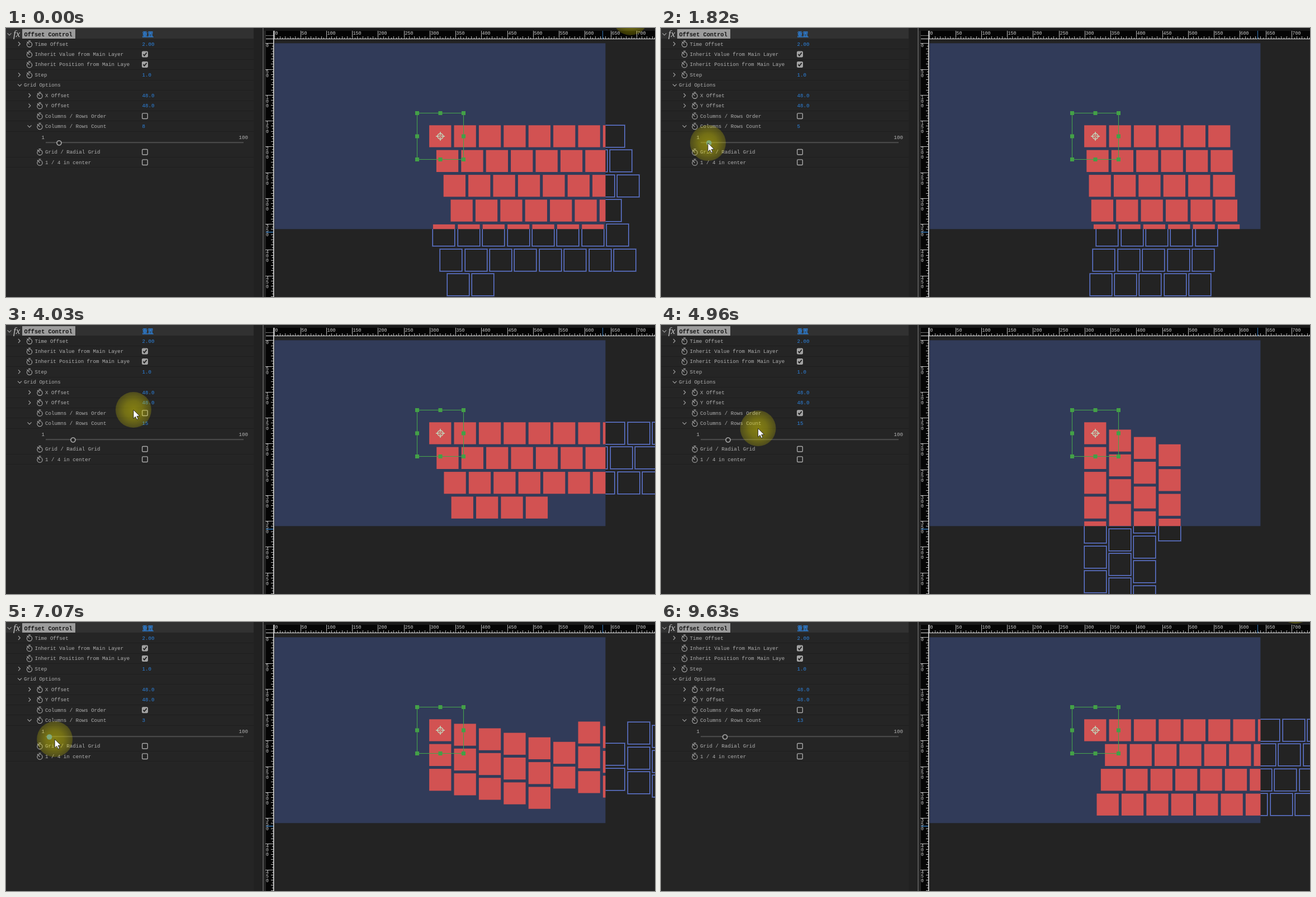
These frames come from a looping animation (1161x482 px, 9.7 s). An HTML page with a canvas:

```html
<!DOCTYPE html>
<html lang="en">
<head>
<meta charset="utf-8">
<title>Offset Control</title>
<style>
html, body { margin: 0; width: 100%; height: 100%; overflow: hidden; background: #232323; }
canvas { display: block; width: 1161px; height: 482px; }
</style>
</head>
<body>
<canvas id="stage" width="1161" height="482"></canvas>
<script>
const W = 1161, H = 482, LOOP = 9700;
const MONO = '"Liberation Mono", "DejaVu Sans Mono", monospace';
const BLUE = '#2d84e0', GREY = '#b0b0b0';
const UNIT = 0.925;
const COMP = { x: 480.4, y: 27.3, w: 640 * UNIT, h: 360 * UNIT };
const CELL = { x: 757.1, y: 174.3, size: 39.3, pitch: 48 * UNIT, total: 49 };
const TRACK = { x: 71, y: 205, w: 354, max: 100 };

// Pointer moves, each easing out from the previous stop
const HOME = { x: 1117, y: -19 };
const MOVES = [
  { from: 70, to: 930, x: 95, y: 206 },
  { from: 1050, to: 1400, x: 105, y: 207 },
  { from: 1452, to: 2112, x: 82, y: 206 },
  { from: 2530, to: 3440, x: 120, y: 207 },
  { from: 3750, to: 4030, x: 228, y: 152 },
  { from: 4100, to: 4400, x: 246, y: 157 },
  { from: 4750, to: 5600, x: 120, y: 206 },
  { from: 5800, to: 6410, x: 77.5, y: 211 },
  { from: 7000, to: 7740, x: 114.5, y: 207 },
  { from: 7750, to: 7980, x: 181, y: 196 },
  { from: 8050, to: 8260, x: 242, y: 159 },
  { from: 8650, to: 9600, x: 1135, y: -29 }
];
const DRAGS = [[1050, 3600], [5800, 7745]];
const ORDER = { on: 4520, off: 8580 };
const CLICKS = [...DRAGS.map(d => d[0]), ORDER.on, ORDER.off];
const LAG = { outline: 70, fill: 143 };

const g = document.getElementById('stage').getContext('2d');

function pointerAt(t) {
  let p = HOME;
  for (const m of MOVES) {
    if (t <= m.from) break;
    const left = (1 - Math.min(1, (t - m.from) / (m.to - m.from))) ** 3;
    p = { x: m.x + (p.x - m.x) * left, y: m.y + (p.y - m.y) * left };
  }
  return p;
}

// The knob follows the pointer while dragged and then holds
function countAt(t) {
  const [start, end] = DRAGS.findLast(d => d[0] <= t) || DRAGS[0];
  const { x } = pointerAt(Math.min(end, Math.max(start, t)));
  return 1 + (x - TRACK.x) * (TRACK.max - 1) / TRACK.w;
}

function rect(x, y, w, h, color) {
  g.fillStyle = color;
  g.fillRect(x, y, w, h);
}

function path(points, color, width = 1.3) {
  g.strokeStyle = color;
  g.lineWidth = width;
  g.beginPath();
  points.forEach(([x, y]) => g.lineTo(x, y));
  g.stroke();
}

function circle(x, y, r, fill, stroke, width = 1.5) {
  g.beginPath();
  g.arc(x, y, r, 0, Math.PI * 2);
  if (fill) { g.fillStyle = fill; g.fill(); }
  if (stroke) { g.strokeStyle = stroke; g.lineWidth = width; g.stroke(); }
}

function text(s, x, y, color = GREY, size = 9.15, font = MONO, style = '') {
  g.font = `${style} ${size}px ${font}`;
  g.fillStyle = color;
  g.fillText(s, x, y);
}

function chevron(x, y, open) {
  path(open ? [[x - 3.5, y - 1.7], [x, y + 1.8], [x + 3.5, y - 1.7]]
            : [[x - 1.5, y - 3.5], [x + 1.8, y], [x - 1.5, y + 3.5]], '#a0a0a0', 1.2);
}

function stopwatch(x, y) {
  circle(x, y + 1, 4.6, null, GREY, 1.1);
  path([[x - 2, y - 5.5], [x + 2, y - 5.5]], GREY, 1.1);
  path([[x - 4.5, y - 4], [x, y + 1]], GREY, 1.1);
}

function checkbox(x, y, on) {
  g.beginPath();
  g.roundRect(x - 4.8, y - 4.8, 9.6, 9.6, 1.5);
  if (on) { g.fillStyle = '#a0a0a0'; g.fill(); }
  g.strokeStyle = '#a8a8a8';
  g.lineWidth = 1.4;
  g.stroke();
  if (on) path([[x - 3, y], [x - 1, y + 2.5], [x + 3.2, y - 2.8]], '#222', 1.8);
}

function slider(count, lit) {
  text('1', 63.5, 198.5);
  text('100', 416.5, 198.5);
  rect(TRACK.x, TRACK.y - 0.8, TRACK.w, 2, '#4c4c4c');
  const x = TRACK.x + (count - 1) * TRACK.w / (TRACK.max - 1);
  if (lit) circle(x, 206, 4.8, BLUE);
  else circle(x, 206, 4, '#252525', '#a8a8a8', 1.7);
}

function panel(count, byColumn, lit) {
  rect(0, 0, 460, H, '#212121');
  rect(0, 0, 443, H, '#252525');
  rect(0, 0, 443, 19, '#313131');
  rect(459, 0, 1.5, H, '#555');

  chevron(6, 11, true);
  text('fx', 13, 16, '#c8c8c8', 17, '"Liberation Serif", serif', 'italic');
  rect(29, 2, 95, 17, '#9c9c9c');
  text('Offset Control', 32.5, 14.5, '#141414', 10.25, MONO, 'bold');
  text('重置', 243.5, 14.5, BLUE, 10, '"Noto Sans CJK SC", "Noto Sans CJK", sans-serif', 'bold');
  rect(244, 15.5, 20, 1, BLUE);

  // label, indent, twirl, value
  const rows = [
    ['Time Offset', 0, 'closed', '2.00'],
    ['Inherit Value from Main Layer', 0, '', true],
    ['Inherit Position from Main Laye', 0, '', true],
    ['Step', 0, 'closed', '1.0'],
    ['Grid Options', 0, 'group'],
    ['X Offset', 1, 'closed', '48.0'],
    ['Y Offset', 1, 'closed', '48.0'],
    ['Columns / Rows Order', 1, '', byColumn],
    ['Columns / Rows Count', 1, 'open', String(Math.round(count))],
    ['Grid / Radial Grid', 1, '', false],
    ['1 / 4 in center', 1, '', false]
  ];
  rows.forEach(([label, indent, twirl, value], i) => {
    const y = 28.5 + 18.45 * (i < 9 ? i : i + 1.5), x = 42 + indent * 18.5;
    rect(0, Math.round(y + 8.8), 443, 1, '#1e1e1e');
    if (twirl === 'group') {
      chevron(24.5, y, true);
      text(label, 32, y + 3);
      return;
    }
    if (twirl) chevron(x - 18.5, y, twirl === 'open');
    stopwatch(x, y);
    text(label, x + 9.5, y + 3);
    if (typeof value === 'boolean') checkbox(248.5, y, value);
    else text(value, 243.5, y + 3.2, BLUE);
  });
  slider(count, lit);
}

function rulers() {
  rect(461, 0, W - 461, 5, '#1a1a1a');
  rect(465, 5, W - 465, 15, '#050505');
  rect(465, 5, 14, H - 5, '#050505');
  for (let u = 0; u < 740; u += 5) {
    const x = Math.round(COMP.x + u * UNIT), y = Math.round(COMP.y + u * UNIT);
    const len = u % 50 ? (u % 10 ? 2 : 4) : 14;
    rect(x, 19 - len, 1, len, '#bbb');
    rect(478 - len, y, len, 1, '#bbb');
    if (u % 50) continue;
    text(String(u), x + 1.5, 12, '#d0d0d0', 8.3);
    [...String(u)].forEach((d, i) => text(d, 465, y + 7 + i * 7.3, '#d0d0d0', 8.3));
  }
  rect(465, 19, W - 465, 1, '#e4e4e4');
  rect(478, 5, 1.5, H - 5, '#e4e4e4');
  for (let x = 465; x < 478; x += 2) rect(x, 13, 1, 1, '#ddd');
  rect(1067, 5, 1, 15, '#3478b8');
  rect(465, 365, 13, 1.5, '#3478b8');
}

// A fractional count shifts every new line by what is left over
function cells({ count, byColumn }, draw) {
  for (let i = 0; i < CELL.total; i++) {
    const line = Math.floor(i / count), step = i - line * count;
    const [u, v] = byColumn ? [line, step] : [step, line];
    draw(CELL.x + u * CELL.pitch, CELL.y + v * CELL.pitch);
  }
}

function outline(x, y) {
  const left = Math.floor(x) + 0.5, top = Math.floor(y) + 0.5;
  g.setLineDash([]);
  g.strokeRect(left, top, 39, 39);
  g.setLineDash([1, 1]);
  g.strokeRect(left - 1, top - 1, 41, 41);
}

function gizmo() {
  const x = 735.5, y = 152.5, s = 83;
  g.strokeStyle = '#46a24e';
  g.lineWidth = 1.1;
  g.strokeRect(x, y, s, s);
  for (let i = 0; i < 3; i++) for (let j = 0; j < 3; j++)
    if (i !== 1 || j !== 1) rect(x + i * s / 2 - 3.5, y + j * s / 2 - 3.5, 7, 7, '#43a047');
  const cx = 777, cy = 194, pale = '#c0dcc0';
  circle(cx, cy, 5, null, pale, 1.4);
  circle(cx, cy, 2, null, pale, 1);
  for (const [dx, dy] of [[1, 0], [-1, 0], [0, 1], [0, -1]])
    path([[cx + dx * 3, cy + dy * 3], [cx + dx * 8, cy + dy * 8]], pale, 1.5);
}

function clipped(rule, shape, draw) {
  g.save();
  g.beginPath();
  shape();
  g.clip(rule);
  draw();
  g.restore();
}

function viewer(live, late) {
  const comp = () => g.rect(COMP.x, COMP.y, COMP.w, COMP.h);
  rect(461, 0, W - 461, H, '#232323');
  rect(COMP.x, COMP.y, COMP.w, COMP.h, '#313b59');
  clipped('evenodd', () => { g.rect(0, 0, W, H); comp(); }, () => {
    g.strokeStyle = '#6079d6';
    g.lineWidth = 1;
    cells(live, outline);
  });
  clipped('nonzero', comp, () =>
    cells(late, (x, y) => rect(x, y, CELL.size, CELL.size, '#d25252')));
  gizmo();
  rulers();
}

function pointer(t) {
  const { x, y } = pointerAt(t);
  const glow = g.createRadialGradient(x, y, 0, x, y, 32);
  glow.addColorStop(0, 'rgba(225,215,0,.5)');
  glow.addColorStop(0.5, 'rgba(225,215,0,.42)');
  glow.addColorStop(1, 'rgba(225,215,0,.22)');
  circle(x, y, 32, glow);

  for (const click of CLICKS) {
    const age = t - click;
    if (age < 0 || age > 210) continue;
    const p = pointerAt(click);
    circle(p.x - 1, p.y + 1, 4.2 + age / 50, 'rgba(190,225,235,.6)', '#ee1c1c', 3);
  }

  g.beginPath();
  [[0, 0], [0, 15.5], [3.6, 12.2], [6, 17.5], [8.4, 16.4], [6.1, 11.3], [11, 11.1]]
    .forEach(([dx, dy]) => g.lineTo(x + dx, y + dy));
  g.closePath();
  g.fillStyle = '#fff';
  g.fill();
  g.strokeStyle = '#111';
  g.lineWidth = 0.8;
  g.stroke();
}

function render(t) {
  const grid = lag => ({
    count: countAt(t - lag),
    byColumn: t - lag >= ORDER.on && t - lag < ORDER.off
  });
  const live = grid(LAG.outline);
  const lit = DRAGS.some(([a, b]) => t >= a && t < b + 300);
  viewer(live, grid(LAG.fill));
  panel(live.count, live.byColumn, lit);
  pointer(t);
}

const start = performance.now();
function tick(now) {
  render(Math.max(0, now - start) % LOOP);
  requestAnimationFrame(tick);
}
render(0);
requestAnimationFrame(tick);
</script>
</body>
</html>
```
